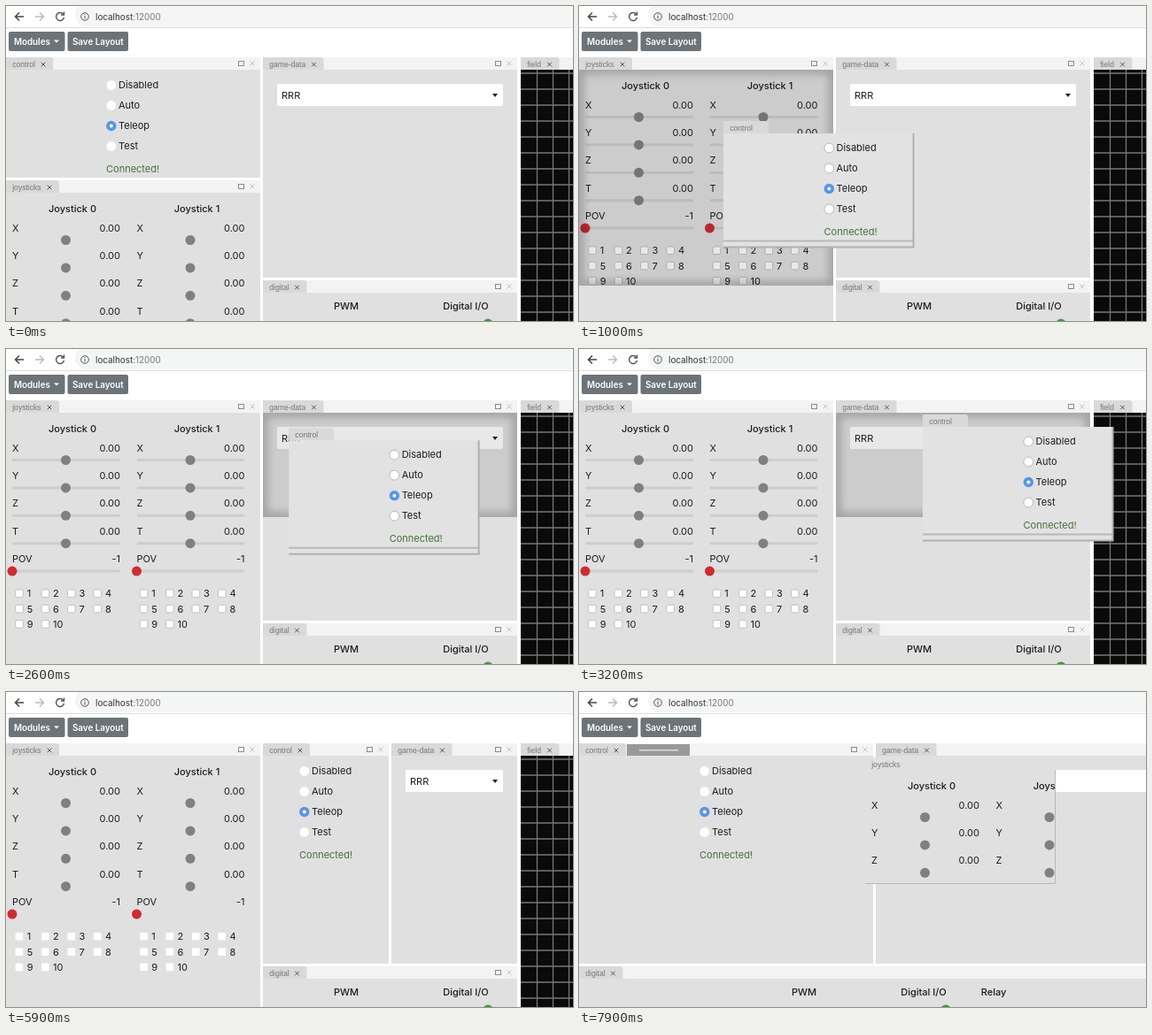
An HTML page that plays this animation: 640x356 px, repeating every 8000 ms.

```html
<!DOCTYPE html>
<html lang="en">
<head>
<meta charset="utf-8">
<title>Dashboard layout</title>
<style>
  html, body { margin: 0; width: 100%; height: 100%; overflow: hidden; background: #fff; }
  svg { display: block; }
  text { font: 11px Inter, "Open Sans", sans-serif; fill: #1c1c1c; white-space: pre; }
  .bold { font-weight: 500; }
  .mid { text-anchor: middle; }
  .end { text-anchor: end; }
  .tab { font: 8.6px "Liberation Sans", Arial, sans-serif; fill: #777; }
  .btn { font-size: 9.8px; font-weight: 600; fill: #fff; }
  .url { font-size: 9.9px; fill: #333; }
  .ok { fill: #47703c; }
</style>
</head>
<body>
<svg id="stage" width="640" height="356" viewBox="0 0 640 356">
  <defs>
    <filter id="soft" x="-20%" y="-20%" width="140%" height="140%"><feGaussianBlur stdDeviation="5"/></filter>
  </defs>
  <g id="layout"></g>
  <g id="chrome"></g>
</svg>
<script>
const LOOP = 8000, STEP = 100;
const CONTROL_DRAG = { from: 400, to: 4700 };
const JOYSTICK_DRAG = { from: 6400, to: LOOP };
const GREY = '#e0e0e0';
const closeX = { control: 42, joysticks: 49, 'game-data': 57.5, digital: 38.5, field: 32.5 };

const rect = (x, y, w, h, fill, extra = '') =>
  `<rect x="${x}" y="${y}" width="${w}" height="${h}" fill="${fill}" ${extra}/>`;
const circle = (x, y, r, fill, extra = '') => `<circle cx="${x}" cy="${y}" r="${r}" fill="${fill}" ${extra}/>`;
const text = (x, y, s, cls = '') => `<text x="${x}" y="${y}" class="${cls}">${s}</text>`;
const line = (d, color, w = 1) => `<path d="${d}" fill="none" stroke="${color}" stroke-width="${w}"/>`;
const clip = (x, y, w, h, body) =>
  `<svg x="${x}" y="${y}" width="${w}" height="${h}" viewBox="${x} ${y} ${w} ${h}">${body}</svg>`;
const cross = (x, y, r, color) =>
  line(`M${x - r} ${y - r}l${2 * r} ${2 * r}m0 ${-2 * r}l${-2 * r} ${2 * r}`, color);

function tab(x, y, name, width, fill = '#d9d9d9') {
  return `<path d="M${x} ${y + 14}v-14h${width - 3}q3 0 3 3v11z" fill="${fill}"/>` +
    text(x + 7.2, y + 11, name, 'tab');
}

// A docked panel: header strip, tab, window icons and clipped content
function panel(name, x, y, w, h, content) {
  const cx = x + closeX[name], right = x + w;
  return rect(x, y, w, 14, '#f3f3f3') + tab(x, y, name, closeX[name] + 11) +
    cross(cx, y + 8, 2.3, '#555') +
    rect(right - 24.5, y + 4.5, 6, 5, 'none', 'stroke="#8c8c8c"') + cross(right - 9, y + 7, 2.5, '#c4c4c4') +
    clip(x, y + 14, w, h - 14, rect(x, y + 14, w, h - 14, GREY) + content);
}

function control(mid, y, fine) {
  const x = mid - 30;
  const rim = fine ? 'stroke="#aaa" stroke-width=".8"' : '';
  return ['Disabled', 'Auto', 'Teleop', 'Test'].map((label, i) => {
    const cy = y + 31.5 + 23 * i;
    const dot = label === 'Teleop'
      ? circle(x + 5.8, cy, 5.7, '#5596e6') + circle(x + 5.8, cy, 2, '#fff')
      : circle(x + 5.8, cy, 5.4, '#fff', rim);
    return dot + text(x + 14, cy + 3.7, label);
  }).join('') + text(x, y + 130, 'Connected!', 'ok');
}

function joystick(x, y, index, fine) {
  let out = text(x + 75, y + 36, 'Joystick ' + index, 'bold mid');
  ['X', 'Y', 'Z', 'T', 'POV'].forEach((axis, i) => {
    const base = y + 57.5 + 31.4 * i, isPov = axis === 'POV';
    out += text(x + 7, base, axis) + text(x + 129, base, isPov ? '-1' : '0.00', 'end');
    if (fine) out += rect(x + 7, base + 8.5, 122, 3, '#cdcdcd', 'rx="1.5"');
    out += circle(x + (isPov ? 7 : 67.5), base + 10, 5.5, isPov ? '#d02b32' : '#808080');
  });
  for (let i = 0; i < 10; i++) {
    const bx = x + 10.7 + 29.4 * (i % 4), by = y + 214 + 17.3 * Math.floor(i / 4);
    out += rect(bx, by, 8.6, 8.6, '#fff', fine ? 'rx="1.5" stroke="#b5b5b5" stroke-width=".8"' : 'rx="1"') +
      text(bx + 13, by + 8.2, i + 1);
  }
  return out;
}

const joysticks = (x, y, fine) => joystick(x, y, 0, fine) + joystick(x + 140.5, y, 1, fine);

function gameData(x, y, w) {
  const end = x + w - 16;
  return rect(x + 16, y + 30, w - 32, 25, '#fff', 'rx="2"') + text(x + 21, y + 47, 'RRR') +
    `<path d="M${end - 12} ${y + 41}h6l-3 4z" fill="#222"/>`;
}

function digital(x, relay) {
  return text(x + 93, 343, 'PWM', 'bold mid') + text(x + 228, 343, 'Digital I/O', 'bold mid') +
    (relay ? text(x + 307, 343, 'Relay', 'bold mid') : '') + circle(x + 253, 359, 5.5, '#3f9a3a');
}

function field() {
  let d = '';
  for (let x = 599.5; x < 640; x += 18) d += `M${x} 72V356`;
  for (let y = 76; y < 356; y += 18) d += `M581 ${y}H640`;
  return rect(581, 72, 59, 284, '#0a0a0a') + line(d, '#777', 1.3);
}

const highlight = (x, y, w, h) => clip(x, y, w, h,
  rect(x, y, w, h, '#000', 'opacity=".09"') +
  rect(x, y, w, h, 'none', 'stroke="#000" stroke-width="10" opacity=".22" filter="url(#soft)"'));

// The floating panel that follows the pointer
function proxy(name, { x, y }, content, fine) {
  const top = y + 14, edge = fine ? '#b0b0b0' : '#b8b8b8';
  return (fine ? tab(x, y, name, 51) : tab(x, y, name, 214, GREY)) +
    clip(x, top, 215, 129, rect(x, top, 215, 129, fine ? '#e2e2e2' : GREY) + content) +
    line(`M${x + 214.5} ${top}V${y + 142.5}H${x}`, edge, fine ? 2 : 1) +
    (fine ? line(`M${x} ${y + 135.5}h214`, '#b8b8b8', 2) : '');
}

// Smooth movement through [time, x, y] points
function along(points, t) {
  const next = points.findIndex(p => p[0] > t);
  if (next < 1) {
    const [, x, y] = points[next < 0 ? points.length - 1 : 0];
    return { x, y };
  }
  const [t0, x0, y0] = points[next - 1], [t1, x1, y1] = points[next];
  const u = (t - t0) / (t1 - t0), e = u * u * (3 - 2 * u);
  return { x: x0 + (x1 - x0) * e, y: y0 + (y1 - y0) * e };
}

const controlPath = [[400, 22, 72], [1000, 163, 130], [2000, 219, 75], [2700, 325, 90],
  [3200, 388, 74], [4100, 351, 134], [4700, 345, 150]];
const joystickPath = [[6400, 24, 70], [7200, 190, 90], [7900, 323, 74]];

function controlTarget(t) {
  if (t < 1500) return highlight(0, 72, 287, 244);
  if (t < 2600) return highlight(145, 72, 142, 488);
  if (t < 3700) return highlight(290, 72, 287, 118);
  return highlight(290, 72, 145, 235);
}

function layout(t) {
  const during = drag => t >= drag.from && t < drag.to;
  if (during(JOYSTICK_DRAG)) {
    const at = along(joystickPath, t);
    return panel('control', 0, 58, 332, 249, control(166, 58)) +
      panel('game-data', 335, 58, 400, 249, gameData(335, 58, 400)) +
      panel('digital', 0, 310, 735, 60, digital(161, true)) +
      rect(54, 59, 71, 13, '#999') + rect(68, 65, 44, 1.5, '#ddd') +
      proxy('joysticks', at, joysticks(at.x, at.y), false);
  }
  const dragging = during(CONTROL_DRAG), docked = t >= CONTROL_DRAG.to;
  const side = panel('digital', 290, 310, 287, 60, digital(291)) +
    panel('field', 581, 58, 100, 300, field());
  const joyTop = t < CONTROL_DRAG.from ? 197 : 58;
  let out = side + panel('joysticks', 0, joyTop, 287, 370 - joyTop, joysticks(0, joyTop, dragging));
  if (docked) {
    return out + panel('control', 290, 58, 142, 249, control(361, 58)) +
      panel('game-data', 435, 58, 142, 249, gameData(435, 58, 142));
  }
  out += panel('game-data', 290, 58, 287, 249, gameData(290, 58, 287));
  if (!dragging) return out + panel('control', 0, 58, 287, 136, control(143, 58));
  const at = along(controlPath, t);
  return out + controlTarget(t) + proxy('control', at, control(at.x + 143.5, at.y - 1, true), true);
}

function chrome() {
  return rect(0, 0, 640, 24, '#fff') + rect(78, -4, 600, 27, '#f4f5f5', 'rx="13"') +
    rect(0, 24, 640, 1, '#dcdcdc') +
    line('M20 12H11M15 7.5L10.5 12L15 16.5', '#444', 1.5) +
    line('M33 12H42M38 7.5L42.5 12L38 16.5', '#bbb', 1.4) +
    line('M64.5 9A4.5 4.5 0 1 0 65.5 13M65.5 6.5V10H62', '#555', 1.4) +
    circle(89, 12, 4.3, 'none', 'stroke="#555"') + rect(88.5, 11, 1, 3.5, '#555') + rect(88.5, 9.2, 1, 1, '#555') +
    text(101, 15.5, 'localhost<tspan fill="#777">:12000</tspan>', 'url') +
    rect(3, 29, 63.5, 22, '#6c7379', 'rx="2"') + text(9, 43.6, 'Modules', 'btn') +
    '<path d="M54 38.5h6l-3 3z" fill="#fff"/>' +
    rect(69.5, 29, 68.5, 22, '#6c7379', 'rx="2"') + text(75, 43.6, 'Save Layout', 'btn');
}

const layoutGroup = document.getElementById('layout');
document.getElementById('chrome').innerHTML = chrome();
const started = performance.now();
let shown = -1;

function draw() {
  const t = Math.floor((performance.now() - started) % LOOP / STEP) * STEP;
  if (t !== shown) {
    layoutGroup.innerHTML = layout(t);
    shown = t;
  }
  requestAnimationFrame(draw);
}
draw();
</script>
</body>
</html>
```
